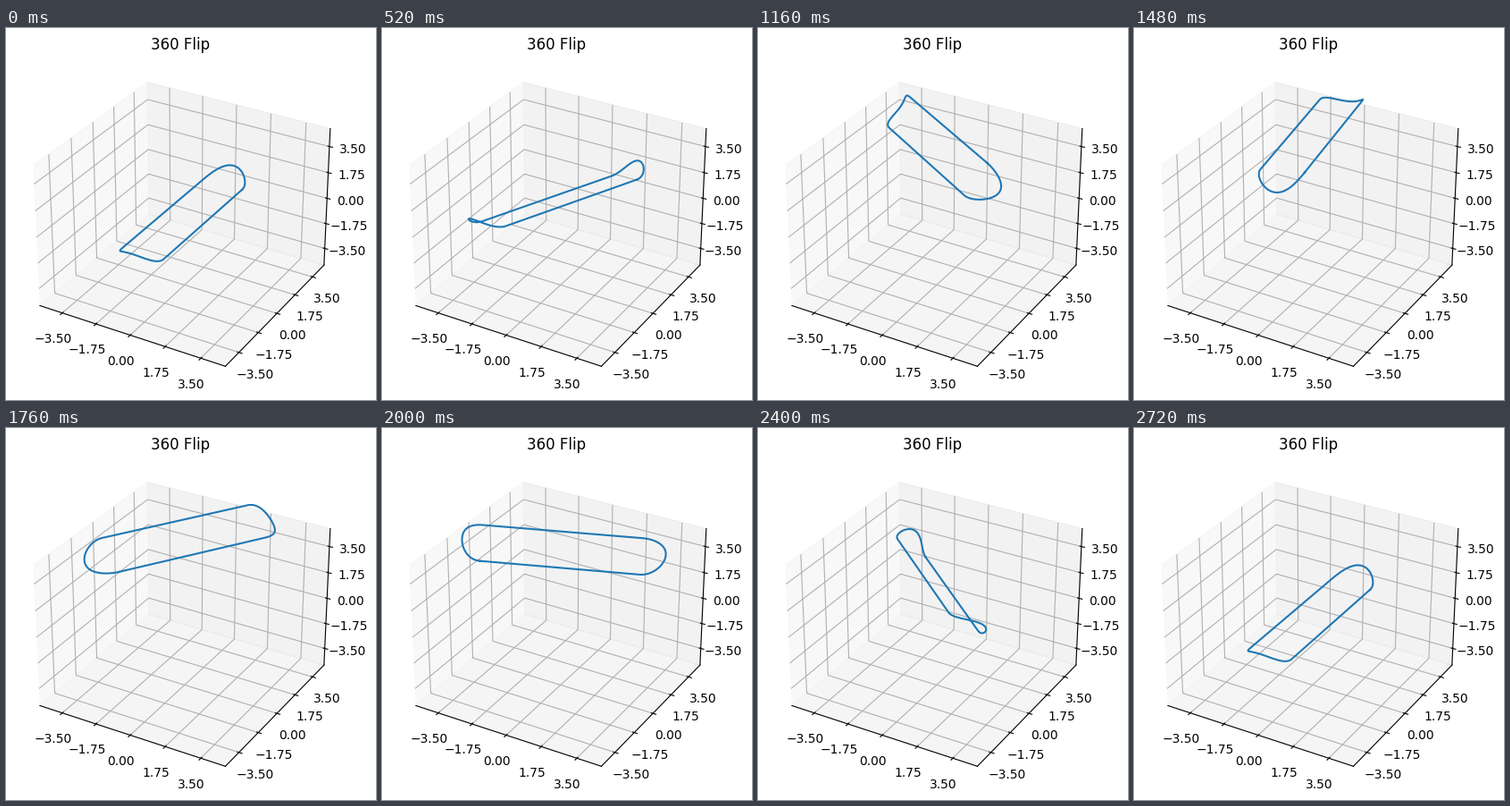
Recreate the animation shown at these times as a matplotlib script. Size 414 px wide and 416 px high, loop 2.76 s.

```python
import numpy as np
import matplotlib.pyplot as plt
from matplotlib.animation import FuncAnimation

W, H, DPI = 414, 416, 100
FRAMES, INTERVAL = 69, 40
HOLD = 9               # frames at rest before the trick starts
HALF_LENGTH = 3.5      # flat part of the deck; the ends are half circles
KICK = 0.65            # rise of nose and tail
JUMP = 5.5
LIMIT = 4.6875


def deck_outline(n=40):
    """Closed outline as (across, along, up) in the board's own axes."""
    a = np.linspace(0, np.pi, n)
    across = np.concatenate([np.cos(a), -np.cos(a)])
    bulge = np.concatenate([np.sin(a), -np.sin(a)])
    along = bulge + HALF_LENGTH * np.repeat([1, -1], n)
    outline = np.array([across, along, KICK * bulge ** 2])
    return np.column_stack([outline, outline[:, 0]])


def pose(t):
    """Deck points at t in 0..1: one full spin and one full flip per jump."""
    angle = 2 * np.pi * t
    c, s = np.cos(angle), np.sin(angle)
    flip = np.array([[c, 0, -s], [0, 1, 0], [s, 0, c]])
    spin = np.array([[c, s, 0], [-s, c, 0], [0, 0, 1]])
    points = spin @ flip @ DECK
    points[2] += JUMP * np.sin(np.pi * t)
    return points


DECK = deck_outline()

# A hair over the whole pixel size guards against rounding down.
fig = plt.figure(figsize=((W + 0.001) / DPI, (H + 0.001) / DPI), dpi=DPI)
side, left, top = 369.6, 10, 32
ax = fig.add_axes([left / W, (H - top - side) / H, side / W, side / H],
                  projection="3d")
ax.set_title("360 Flip")

ticks = np.linspace(-3.5, 3.5, 5)
ax.set(xlim=(-LIMIT, LIMIT), ylim=(-LIMIT, LIMIT), zlim=(-LIMIT, LIMIT),
       xticks=ticks, yticks=ticks, zticks=ticks)
ax.view_init(elev=30, azim=-60)

board, = ax.plot(*pose(0), color="C0", lw=1.5)
ax.set(xlim=(-LIMIT, LIMIT), ylim=(-LIMIT, LIMIT), zlim=(-LIMIT, LIMIT))


def update(i):
    t = max(0, i - HOLD) / (FRAMES - 1 - HOLD)
    board.set_data_3d(*pose(t))
    return board,


anim = FuncAnimation(fig, update, frames=FRAMES, interval=INTERVAL,
                     repeat=True, repeat_delay=0, blit=False)
plt.show()
```
